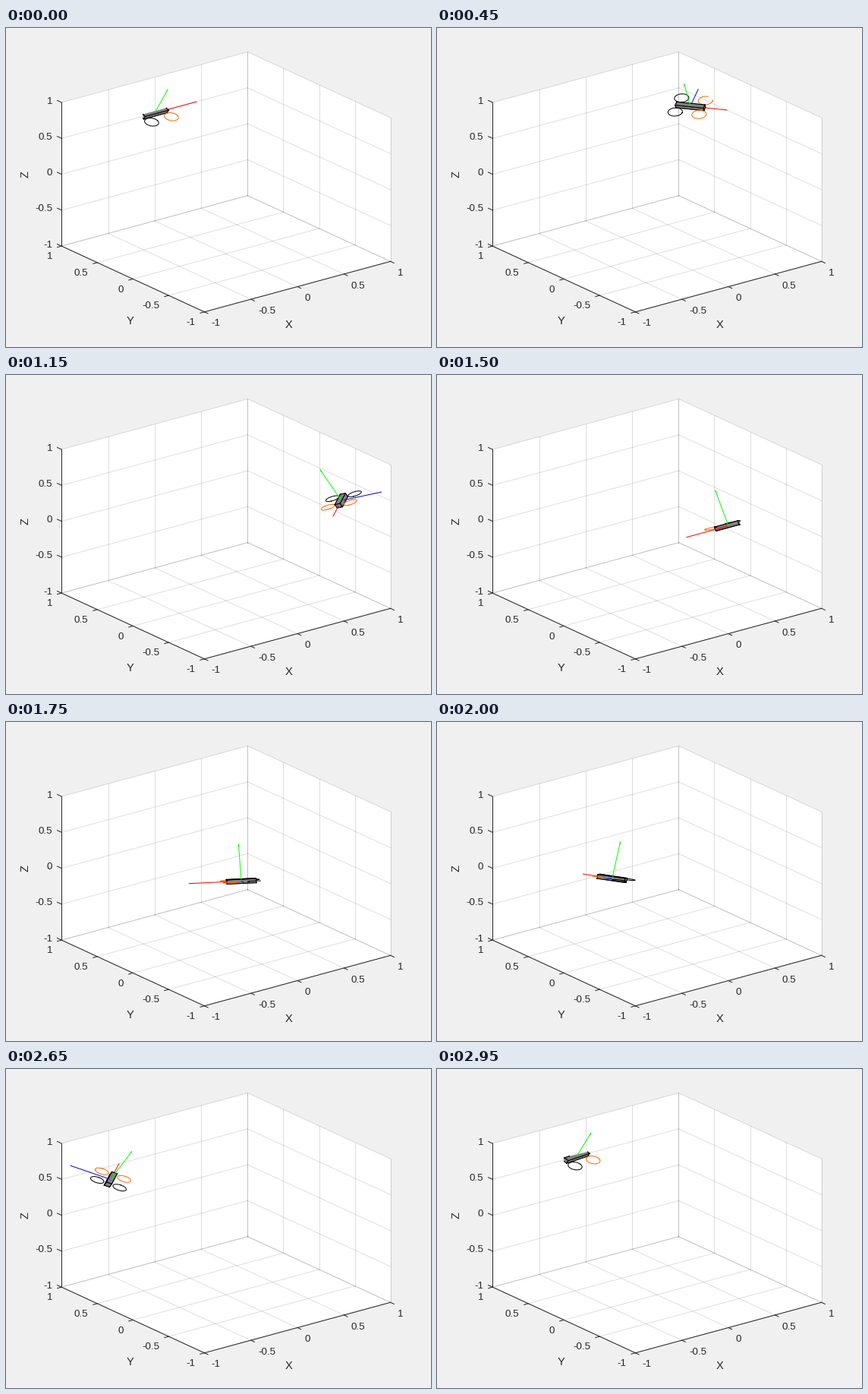
Recreate the animation shown at these times as a matplotlib script. Size 560 by 420 pixels, loop 3 s.

```python
import numpy as np
import matplotlib.pyplot as plt
from matplotlib.animation import FuncAnimation

W, H, FRAMES, STEP = 560, 420, 60, 50
PX = 0.9                      # one pixel in points at 80 dpi
INK = (0.15, 0.15, 0.15)
ORANGE = (1, 0.4, 0)
FONT = "Liberation Sans"

# Orthographic view, azimuth -37.5, elevation 30, stretched to the stage
AZ, EL = np.radians(37.5), np.radians(30)
SX, SY = 154.55, 109.2
PROJ = np.array([
    [SX * np.cos(AZ), -SX * np.sin(AZ), 0],
    [-SY * np.sin(AZ) * np.sin(EL), -SY * np.cos(AZ) * np.sin(EL), -SY * np.cos(EL)],
])
CENTER = np.array([289.4, 202.15])
VIEW = np.array([-np.sin(AZ) * np.cos(EL), -np.cos(AZ) * np.cos(EL), np.sin(EL)])

# Vehicle
OMEGA = 2 * np.pi / (FRAMES * STEP / 1000)
BANK = np.arctan(OMEGA ** 2 / 9.81)
HALF = np.array([0.125, 0.025, 0.025])
ARM = 0.15 / np.sqrt(2)
ROTOR = 0.062
AXIS = 0.45
EPS = 1e-9

fig = plt.figure(figsize=(W / 80, H / 80), dpi=80, facecolor="#f0f0f0")
ax = fig.add_axes([0, 0, 1, 1])
ax.set_xlim(-0.5, W - 0.5)
ax.set_ylim(H - 0.5, -0.5)
ax.axis("off")


def project(pts):
    return np.asarray(pts, float) @ PROJ.T + CENTER


# Lines and fills share one zorder, so they stack in drawing order
def line(pts, color, width=1.0, **kw):
    x, y = project(pts).T
    return ax.plot(x, y, color=color, lw=width * PX, zorder=2, **kw)[0]


def fill(pts, color):
    x, y = project(pts).T
    return ax.fill(x, y, facecolor=color, edgecolor="none", zorder=2)[0]


def inside(pts):
    return np.all(np.abs(pts) <= 1 + EPS, axis=-1)


def clip_segment(p, q):
    """Part of p-q inside the unit cube, or None."""
    lo, hi = 0.0, 1.0
    for a, d in zip(p, q - p):
        for s in (-1, 1):
            room = 1 + EPS - s * a
            if abs(d) < 1e-12:
                if room < 0:
                    return None
            elif s * d > 0:
                hi = min(hi, room / (s * d))
            else:
                lo = max(lo, room / (s * d))
    return (p + lo * (q - p), p + hi * (q - p)) if lo < hi else None


def clip_polygon(pts):
    for k in range(3):
        for s in (-1, 1):
            out = []
            for i, p in enumerate(pts):
                o = pts[i - 1]
                a, b = 1 + EPS - s * o[k], 1 + EPS - s * p[k]
                if (a < 0) != (b < 0):
                    out.append(o + (p - o) * a / (a - b))
                if b >= 0:
                    out.append(p)
            pts = out
    return pts


def draw_stage():
    walls = [(0, 1), (1, 1), (2, -1)]
    for k, side in walls:
        a, b = [i for i in range(3) if i != k]
        quad = np.zeros((4, 3))
        quad[:, k] = side
        quad[:, a] = [-1, 1, 1, -1]
        quad[:, b] = [-1, -1, 1, 1]
        fill(quad, "white")
    for k, side in walls:
        a, b = [i for i in range(3) if i != k]
        for fixed, run in ((a, b), (b, a)):
            for v in np.linspace(-1, 1, 5):
                ends = np.zeros((2, 3))
                ends[:, k] = side
                ends[:, fixed] = v
                ends[:, run] = [-1, 1]
                line(ends, INK, alpha=0.15)

    # axis, fixed corner, tick direction, label offset, alignment
    rulers = [
        (0, (0, -1, -1), (0, -0.05, 0), (9.3, 14.2), "left"),
        (1, (-1, 0, -1), (-0.045, 0, 0), (-12, 12.6), "right"),
        (2, (-1, 1, 0), (0, 0.06, 0), (-12, -3), "right"),
    ]
    for k, corner, tick, (dx, dy), align in rulers:
        ends = np.array([corner, corner], float)
        ends[:, k] = [-1, 1]
        line(ends, INK)
        for v in np.linspace(-1, 1, 5):
            p = np.array(corner, float)
            p[k] = v
            line([p, p + tick], INK)
            x, y = project(p)
            ax.text(x + dx, y + dy, f"{v:g}", color=INK, family=FONT,
                    size=13.33 * PX, ha=align, va="center_baseline")
    for name, x, y, turn in (("X", 372.4, 391, 0), ("Y", 163.3, 385.7, 0), ("Z", 25, 192, 90)):
        ax.text(x, y, name, color=INK, family=FONT, size=14.67 * PX,
                ha="center", va="center", rotation=turn)


def box_face(pos, body, k, s):
    a, b = [i for i in range(3) if i != k]
    local = np.zeros((4, 3))
    local[:, k] = s * HALF[k]
    local[:, a] = HALF[a] * np.array([-1, 1, 1, -1])
    local[:, b] = HALF[b] * np.array([-1, -1, 1, 1])
    pts = list(pos + local @ body)
    art = []
    poly = clip_polygon(pts)
    if len(poly) > 2:
        art.append(fill(poly, (0.5, 0.5, 0.5)))
    for i in range(4):
        art += stroke(pts[i - 1], pts[i], "black")
    return art


def stroke(p, q, color):
    part = clip_segment(p, q)
    return [line(part, color)] if part else []


def arrow(start, tip, color):
    art = stroke(start, tip, color)
    d = (tip - start) / np.linalg.norm(tip - start)
    side = np.cross(d, VIEW)
    side /= np.linalg.norm(side)
    head = np.array([tip, tip - 0.03 * d + 0.007 * side, tip - 0.03 * d - 0.007 * side])
    if inside(head).all():
        art.append(fill(head, color))
    return art


def rotors(pos, body, side):
    art = []
    u = np.linspace(0, 2 * np.pi, 121)
    for sx, color in ((-1, "black"), (1, ORANGE)):
        local = np.column_stack([sx * ARM + ROTOR * np.cos(u),
                                 side * ARM + ROTOR * np.sin(u), 0 * u])
        pts = pos + local @ body
        pts[~inside(pts)] = np.nan
        art.append(line(pts, color))
    return art


def vehicle(phi):
    s, c = np.sin(phi), np.cos(phi)
    pos = np.array([s, c, 0.5])
    fwd = np.array([c, -s, 0])
    up = np.array([-s * np.sin(BANK), -c * np.sin(BANK), np.cos(BANK)])
    body = np.array([fwd, np.cross(up, fwd), up])
    facing = body @ VIEW
    axes = list(zip(body, HALF, ("red", "blue", "lime"), facing))
    faces = [(k, sg) for k in range(3) for sg in (-1, 1)]

    def outside(front):
        art = []
        for side in (-1, 1):
            if (side * facing[1] > 0) == front:
                art.extend(rotors(pos, body, side))
        for d, h, color, f in axes:
            if (f > 0) == front:
                art.extend(arrow(pos + h * d, pos + AXIS * d, color))
        return art

    def shell(front):
        return [a for k, sg in faces if (sg * facing[k] > 0) == front
                for a in box_face(pos, body, k, sg)]

    # back to front
    art = outside(False) + shell(False)
    for d, h, color, _ in axes:
        art += stroke(pos, pos + h * d, color)
    return art + shell(True) + outside(True)


current = []


def update(i):
    while current:
        current.pop().remove()
    current.extend(vehicle(2 * np.pi * i / FRAMES))
    return current


draw_stage()
anim = FuncAnimation(fig, update, frames=FRAMES, interval=STEP,
                     repeat=True, repeat_delay=0, blit=False)
plt.show()
```
